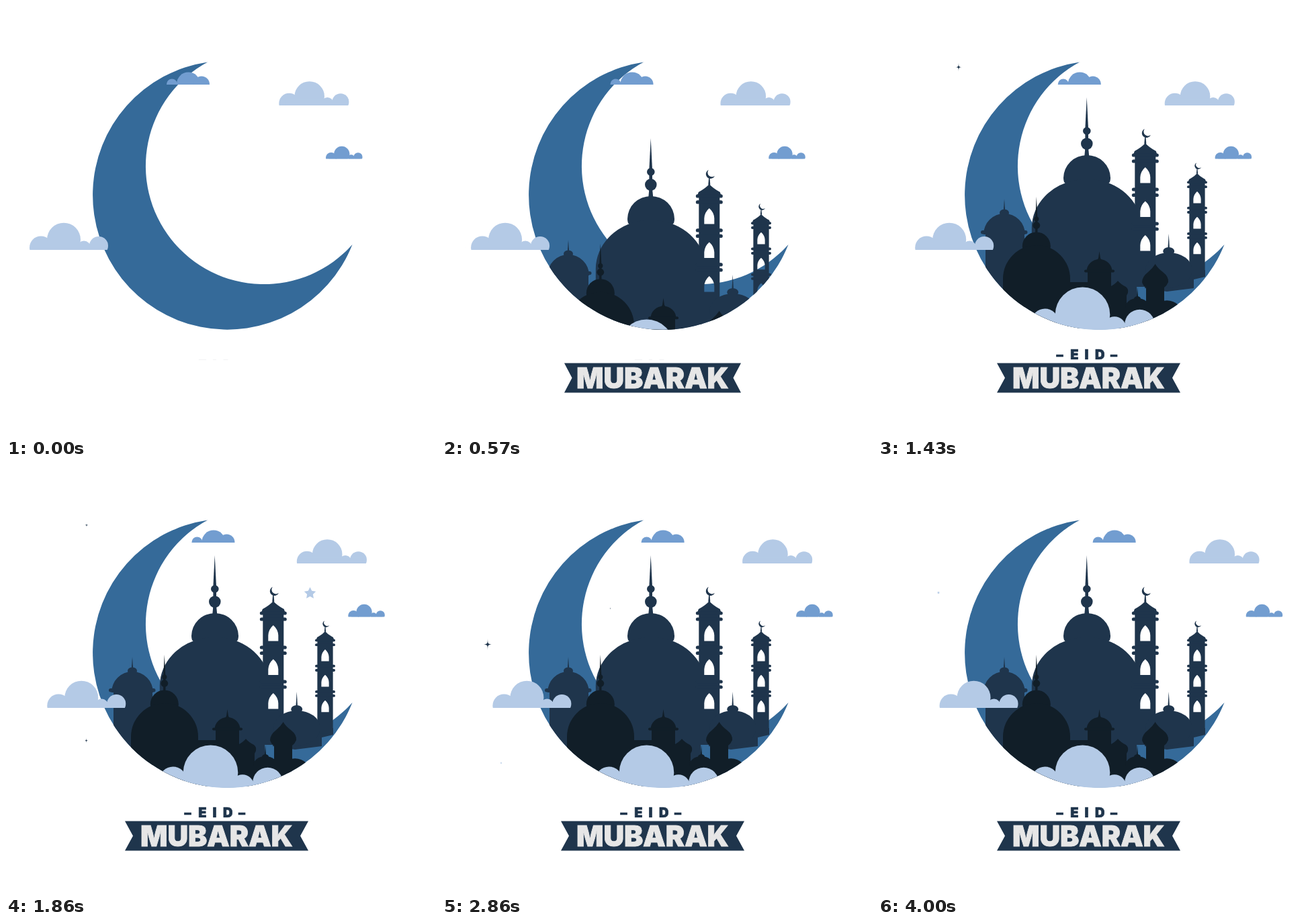
An HTML page that plays this animation: 640x640 px, repeating every 4.07 s.

```html
<!DOCTYPE html>
<html lang="en">
<head>
<meta charset="utf-8">
<title>Eid Mubarak</title>
<style>
  html, body { margin: 0; width: 100%; height: 100%; overflow: hidden; background: #fff; }
  svg { display: block; width: 100vw; height: 100vh; }
  text { font-family: Inter, "Open Sans", sans-serif; font-weight: 900; }
  .back { fill: #1f354c; }
  .front { fill: #111e28; }
  .pale { fill: #b4cae6; }
  .mid { fill: #729dd0; }
</style>
</head>
<body>
<svg viewBox="0 0 640 640">
  <defs>
    <clipPath id="sky"><path d="M0 0H640V281.6H529.4A200.2 200.2 0 0 1 129 281.6H0z"/></clipPath>
    <clipPath id="flat"><rect x="-5" y="-60" width="140" height="60"/></clipPath>
    <clipPath id="line"><rect x="250" y="500" width="130" height="26.2"/></clipPath>
    <clipPath id="ribbon"><path id="ribbonClip" d="M-136.5 531.5H136.5L124.5 553.5L136.5 575.5H-136.5L-124.5 553.5z"/></clipPath>
    <g id="puff" clip-path="url(#flat)">
      <circle cx="17" cy="-3.5" r="17"/>
      <circle cx="51" cy="-15.3" r="25"/>
      <circle cx="81" cy="-3.5" r="10"/>
      <circle cx="103" cy="-6" r="14"/>
      <rect x="10" y="-9" width="100" height="9"/>
    </g>
    <g id="wisp" clip-path="url(#flat)">
      <circle cx="8" cy="-.5" r="8"/>
      <circle cx="32.5" cy="-1" r="17.5"/>
      <circle cx="52" cy="-.5" r="12"/>
    </g>
    <g id="tower">
      <path d="M-1-39A6.8 6.8 0 1 0 8-30A6.4 6.4 0 0 1-1-39z"/>
      <path d="M-.7-27H.7L1.5-17H-1.5z"/>
      <path fill-rule="evenodd" d="M0-18Q5-12 16-6L18 0L15.5 2V185H-15.5V2L-18 0L-16-6Q-5-12 0-18z
        M-7.5 41.5V33Q-7 24 0 18Q7 24 7.5 33V41.5z
        M-7.5 92V83.5Q-7 74.5 0 68.5Q7 74.5 7.5 83.5V92z
        M-7.5 142.5V134Q-7 125 0 119Q7 125 7.5 134V142.5z"/>
      <g id="rings"></g>
    </g>
    <path id="spark" d="M0-1C.02-.05 .05-.02 1 0C.05 .02 .02 .05 0 1C-.02 .05-.05 .02-1 0C-.05-.02-.02-.05 0-1z"/>
    <path id="star"/>
  </defs>

  <path fill="#356a99" d="M300 83.4A200.2 200.2 0 1 0 515.5 355A176 176 0 1 1 300 83.4z"/>

  <g clip-path="url(#sky)">
    <g id="back" class="back">
      <path d="M310.7 136L313 182V226H308.4V182z"/>
      <circle cx="310.8" cy="186" r="5.8"/>
      <circle cx="310.8" cy="205" r="8.8"/>
      <path d="M307 226L308.5 211H313L314.5 226z"/>
      <path d="M277 262Q276 259 276 256A35 34 0 0 1 346 256Q346 259 345 262L338 270H284z"/>
      <path d="M228.8 480V330A82 73 0 0 1 388 306V418H385V480z"/>
      <path d="M385 366H413V393H487V403L470 407V420L430 425L397 420V418H385z"/>
      <use href="#tower" transform="translate(397.8 222)"/>
      <use href="#tower" transform="translate(475 262.4) scale(.75)"/>
      <path d="M432.7 339L434 361H431.4z"/>
      <ellipse cx="432.7" cy="365" rx="8.5" ry="6"/>
      <ellipse cx="433" cy="393" rx="35" ry="26"/>
      <path d="M188 287L189.2 304H186.8z"/>
      <ellipse cx="188" cy="308" rx="7" ry="5.5"/>
      <path d="M157 340A31 31 0 0 1 219 340H218V480H160V340z"/>
      <rect x="153" y="334" width="69.5" height="5.4" rx="2.7"/>
    </g>
    <g id="front" class="front">
      <path d="M235.8 284L237.5 318V340H234.1V318z"/>
      <circle cx="235.8" cy="317" r="3.6"/>
      <circle cx="235.8" cy="326.5" r="5.4"/>
      <circle cx="235.8" cy="357.5" r="21"/>
      <path d="M186 480V406A50 50 0 0 1 286 406V480z"/>
      <path d="M280 411H347V480H280z"/>
      <path d="M329.5 365L331 375Q332 378 336 379H323Q327 378 328 375z"/>
      <path d="M310.5 395A19 18 0 0 1 348.5 395H347V420H312V395z"/>
      <rect x="307" y="392.5" width="45" height="4" rx="2"/>
      <path d="M357 409Q361 414 369 418Q373 421 372 427L370 431V480H345V418Q353 414 357 409z"/>
      <path d="M386 418L387 432Q391 433 391 436H381Q381 433 385 432z"/>
      <path d="M368 480V449A18 14 0 0 1 404 449V480z"/>
      <path d="M412.7 384Q416 390 424 396Q433 403 432 411Q430 416 426 419V480H399V419Q394 416 393 411Q393 403 402 396Q409 390 412.7 384z"/>
      <path d="M420 480V440Q436 435 447 445V480z"/>
    </g>
    <g id="bank" class="pale">
      <circle cx="248.5" cy="470.5" r="20"/>
      <circle cx="304.5" cy="459.3" r="40.8"/>
      <circle cx="352" cy="479" r="16.8"/>
      <circle cx="389.5" cy="474" r="22.3"/>
      <rect x="245" y="472" width="150" height="20"/>
    </g>
  </g>

  <g id="clouds"></g>
  <g id="stars"></g>

  <path id="banner" class="back" d="M-136.5 531.5H136.5L124.5 553.5L136.5 575.5H-136.5L-124.5 553.5z"/>
  <g clip-path="url(#ribbon)">
    <text x="313.3" y="569.2" font-size="42.5" letter-spacing="-.2" text-anchor="middle"
      fill="#e6e6e6" stroke="#e6e6e6" stroke-width=".8">MUBARAK</text>
  </g>
  <g id="eid" class="back" clip-path="url(#line)" font-size="20" text-anchor="middle"
    stroke="#1f354c" stroke-width=".7"></g>
</svg>
<script>
  const LOOP = 4070, FPS = 14;
  const $ = id => document.getElementById(id);

  function add(parent, tag, attrs) {
    const el = document.createElementNS("http://www.w3.org/2000/svg", tag);
    for (const k in attrs) el.setAttribute(k, attrs[k]);
    return $(parent).appendChild(el);
  }
  const place = (el, x, y, s = 1, sy = s) =>
    el.setAttribute("transform", `translate(${x} ${y}) scale(${s} ${sy})`);

  // share of the way still to go, easing out
  const left = (t, start, dur) => (1 - Math.min(1, Math.max(0, (t - start) / dur))) ** 2;

  $("star").setAttribute("d", "M" + Array.from({ length: 10 }, (_, i) => {
    const r = i % 2 ? 0.5 : 1, a = i * Math.PI / 5;
    return `${r * Math.sin(a)} ${-r * Math.cos(a)}`;
  }).join("L") + "z");

  for (const y of [0, 9, 51, 59.5, 102, 110])
    add("rings", "rect", { x: -20, y: y - 2.6, width: 40, height: 5.2, rx: 2.6 });

  // shape, colour, x, baseline, scale, pixels per step
  const clouds = [
    ["puff", "pale", 35, 363, 1, 1.01],
    ["puff", "pale", 406.3, 148, 0.89, 1.02],
    ["puff", "mid", 476, 227.5, 0.466, 1.28],
    ["wisp", "mid", 239, 117, 1, 1.44]
  ].map(([shape, cls, x, y, s, v]) =>
    ({ el: add("clouds", "use", { href: "#" + shape, class: cls }), x, y, s, v }));

  // shape, x, y, radius, start
  const stars = [
    ["spark", 120, 91, 10, 1280],
    ["star", 452.5, 192.5, 9.2, 1535],
    ["spark", 119.5, 411.5, 8, 1740],
    ["spark", 68, 268.5, 8.5, 2540],
    ["spark", 250.5, 215, 8, 2810],
    ["star", 88, 445, 6.5, 2810],
    ["spark", 377, 152, 7.5, 3180],
    ["spark", 489.5, 190, 6, 3300],
    ["star", 90, 191.5, 9, 3400]
  ].map(([shape, x, y, r, start]) => ({
    el: add("stars", "use", { href: "#" + shape, class: shape === "star" ? "pale" : "back" }),
    x, y, r, start
  }));

  const letters = [["–", 270.5], ["E", 292.5], ["I", 310.5], ["D", 330.3], ["–", 351]].map(([c, x]) => {
    const el = add("eid", "text", { x, y: 525.6 });
    el.textContent = c;
    return el;
  });

  function draw(ms) {
    const step = Math.floor((ms % LOOP + 5) * FPS / 1000) % 57;
    const t = step * 1000 / FPS;

    place($("back"), 0, 346 * left(t, 20, 950));
    place($("front"), 0, 200 * left(t, 181, 953));
    place($("bank"), 0, 64 * left(t, 464, 802));

    const open = 1 - left(t, 70, 620);
    place($("banner"), 313.5, 0, open, 1);
    place($("ribbonClip"), 313.5, 0, open, 1);
    letters.forEach((el, i) => place(el, 0, 16 * left(t, 584 + 60 * i, 400)));

    for (const c of clouds) place(c.el, c.x + c.v * step, c.y, c.s);
    for (const s of stars) {
      const p = (t - s.start) / 650;
      place(s.el, s.x, s.y, p > 0 && p < 1 ? s.r * Math.sin(Math.PI * p) : 0);
    }
  }

  const begin = performance.now();
  (function tick() {
    draw(performance.now() - begin);
    requestAnimationFrame(tick);
  })();
</script>
</body>
</html>
```
